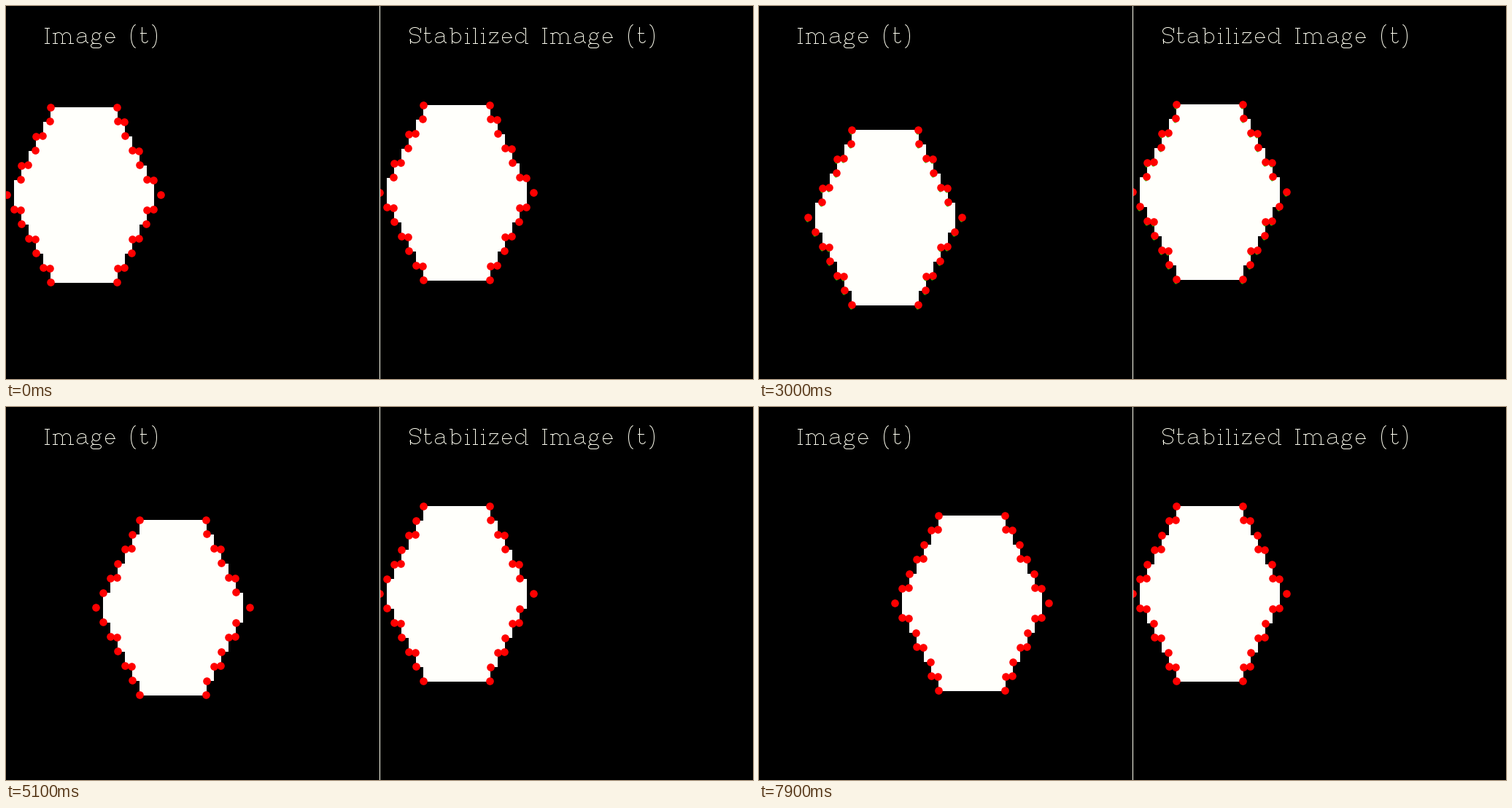
Recreate the animation shown at these times as a matplotlib script. Size 1024x512 px, loop 8 s.

```python
import numpy as np
import matplotlib.pyplot as plt
from matplotlib.animation import FuncAnimation
from matplotlib.collections import EllipseCollection, LineCollection
from matplotlib.patches import Polygon, Rectangle

W, H, DPI = 1024, 512, 100
FRAMES, STEP_MS = 80, 100
PX = 72 / DPI
FILL, INK, RED, GREEN = "#fffffb", "#fffff0", "#ff0000", "#00ff00"
SPLIT = 512

# Key poses of the shape's top left corner: frame, x, y, speed x, speed y
KEYS = np.array([
    (0, 61, 139, 1, 0), (13, 83, 159, 1, 0), (22, 103, 137, 4, 7.5),
    (37, 150, 160, 4, -5), (51, 183, 155, 2, 0), (64, 222, 167, 2, 0),
    (79, 246, 149, 1, 0)])


def shaky(i):
    """Smooth curve through the key poses with a tremble in between."""
    k = np.clip(np.searchsorted(KEYS[:, 0], i, side="right") - 1, 0, len(KEYS) - 2)
    a, b = KEYS[k], KEYS[k + 1]
    span = b[0] - a[0]
    u = (i - a[0]) / span
    ease = u * u * (3 - 2 * u)
    pos = a[1:3] + (b[1:3] - a[1:3]) * ease
    pos = pos + span * u * (1 - u) * (a[3:] * (1 - u) - b[3:] * u)
    tremble = np.sin(np.pi * u) ** 2 * np.sin(6 * np.pi * u)
    return np.round(pos + tremble * np.array([2, 5]))


def steady(i):
    fade = 1 - i / FRAMES
    return np.round([572, 136 + 1.2 * fade * np.sin(2 * np.pi * i / 47)])


def hexagon():
    """Outline with 10 by 20 steps, relative to the top left corner."""
    left = []
    for k in range(6):
        left += [(-10 * k, 20 * k), (-10 * k, 20 * k + 20)]
    left += [(x, 241 - y) for x, y in left[::-1]]
    right = [(92 - x, y) for x, y in left[::-1]]
    return np.array(left + right, float)


def flank(code):
    """Dots on a stair: near (N) or far (F) corners on each step,
    the other kind only on steps of the given parity."""
    pts = []
    for k in range(5):
        both = k % 2 == int(code[1])
        if code[0] == "N" or both:
            pts.append((10 * k + 1, 20 * k + 19))
        if code[0] == "F" or both:
            pts.append((10 * k + 10, 20 * k + 20))
    return pts


def corners(codes):
    """Tracked dots; codes go top left, bottom left, top right, bottom right."""
    def side(top, bottom):
        pts = [(0, 0), (0, 240), (60, 120)] + flank(top)
        return pts + [(x, 240 - y) for x, y in flank(bottom)]
    tl, bl, tr, br = codes.split()
    left = [(-x, y) for x, y in side(tl, bl)]
    right = [(91 + x, y) for x, y in side(tr, br)]
    return np.array(left + right, float)


PATTERNS = [(18, corners("N1 F0 N0 F0")), (45, corners("N1 F1 N1 F1")),
            (58, corners("F1 F1 N1 N1")), (FRAMES, corners("F0 N0 F0 N0"))]


def features(i):
    return next(pts for end, pts in PATTERNS if i < end)


# Stroke lettering: units are pixels, y up from the baseline
def arc(cx, cy, rx, ry, a, b):
    t = np.radians(np.linspace(a, b, 24))
    return list(zip(cx + rx * np.cos(t), cy + ry * np.sin(t)))


def bar(x0, x1, y):
    return [(x0, y), (x1, y)]


def stem(x, y0, y1):
    return [(x, y0), (x, y1)]


def flip(strokes, width):
    return [[(width - x, y) for x, y in s] for s in strokes]


def post(height):
    return [stem(5, 0, height), bar(2, 5, height), bar(2, 8, 0)]


def arch(x):
    return [arc(x + 5.5, 8, 5.5, 6, 150, 0) + [(x + 11, 0)], bar(x + 8, x + 14, 0)]


def letter_a():
    belly = [(15, 9), (7, 8)] + arc(7, 4, 4, 4, 90, 270) + [(10, 0), (15, 3)]
    return [arc(9.5, 10, 5.5, 4, 170, 0) + [(15, 3), (17, 0), (18, 0)], belly]


def letter_g():
    loop = [(5, 6), (3, 3), (4, 0), (7, -1)]
    loop += arc(12, -4, 4, 3, 90, -90) + arc(6, -4, 4, 3, 270, 90)
    return [arc(9, 9, 5, 5, 0, 360), [(13, 12), (14, 13), (16, 14)], loop]


def letter_s():
    curve = arc(10, 16, 7, 5, 20, 240) + arc(10, 5.5, 7, 5.5, 60, -160)
    return [stem(17, 15, 21), curve, stem(3, 0, 6)]


BOWL = [arc(11.5, 7, 6.5, 7, 150, -150)]
PAREN = [arc(11, 9, 7, 16, 100, 260)]
GLYPHS = {
    " ": (16, []),
    "I": (11, post(21) + [bar(5, 8, 21)]),
    "S": (20, letter_s()),
    "a": (20, letter_a()),
    "b": (21, [stem(5, 0, 21), bar(2, 5, 21)] + BOWL),
    "d": (21, [stem(16, 0, 21), bar(13, 16, 21), bar(16, 19, 0)] + flip(BOWL, 21)),
    "e": (18, [bar(3, 15, 8), arc(9, 7, 6, 7, 8, 325)]),
    "g": (19, letter_g()),
    "i": (11, post(14) + [stem(5, 20, 21)]),
    "l": (11, post(21)),
    "m": (33, post(14) + arch(5) + arch(16)),
    "t": (15, [stem(5, 4, 21) [::-1] + arc(9, 4, 4, 4, 180, 340), bar(2, 10, 14)]),
    "z": (18, [[(4, 11), (4, 14), (15, 14), (3, 0), (15, 0), (15, 3)]]),
    "(": (14, PAREN),
    ")": (14, flip(PAREN, 14)),
}


def lettering(text, x, y):
    lines = []
    for ch in text:
        width, strokes = GLYPHS[ch]
        lines += [[(x + px + 0.5, y - py + 0.5) for px, py in s] for s in strokes]
        x += width
    return lines


fig = plt.figure(figsize=(W / DPI, H / DPI), dpi=DPI, facecolor="black")
ax = fig.add_axes([0, 0, 1, 1])
ax.set_xlim(0, W)
ax.set_ylim(H, 0)
ax.axis("off")


class Panel:
    """One half of the stage: shape, tracked dots and motion trails."""

    def __init__(self, x0, place):
        self.place = place
        clip = Rectangle((x0, 0), SPLIT, H, transform=ax.transData)
        self.shape = Polygon(hexagon(), fc=FILL, ec="none", zorder=1)
        self.trails = LineCollection([], colors=GREEN, linewidths=1.5 * PX, zorder=2)
        self.tails = self.discs(4, GREEN, 2)
        self.dots = self.discs(10.6, RED, 3)
        ax.add_patch(self.shape)
        for c in (self.trails, self.tails, self.dots):
            ax.add_collection(c, autolim=False)
        for a in (self.shape, self.trails, self.tails, self.dots):
            a.set_clip_path(clip)

    def discs(self, size, color, z):
        return EllipseCollection([size], [size], [0], units="xy", offsets=np.zeros((1, 2)),
                                 offset_transform=ax.transData, facecolors=color,
                                 edgecolors="none", zorder=z)

    def show(self, i, move):
        corner = self.place(i)
        self.shape.set_xy(corner + hexagon())
        now = corner + features(i) + 0.5
        before = now - move
        self.trails.set_segments(np.stack([before, now], axis=1))
        self.tails.set_offsets(before)
        self.dots.set_offsets(now)


panels = [Panel(0, shaky), Panel(SPLIT, steady)]
ax.add_patch(Rectangle((SPLIT, 0), 1, H, fc=INK, ec="none", zorder=5))
titles = lettering("Image (t)", 50, 50) + lettering("Stabilized Image (t)", 550, 50)
ax.add_collection(LineCollection(titles, colors=INK, linewidths=PX, capstyle="projecting",
                                 zorder=6), autolim=False)


def draw(i):
    move = shaky(i) - shaky(max(i - 1, 0))
    for p in panels:
        p.show(i, move)
    return []


anim = FuncAnimation(fig, draw, frames=FRAMES, interval=STEP_MS, init_func=lambda: draw(0),
                     repeat=True, repeat_delay=0, blit=False)
plt.show()
```
